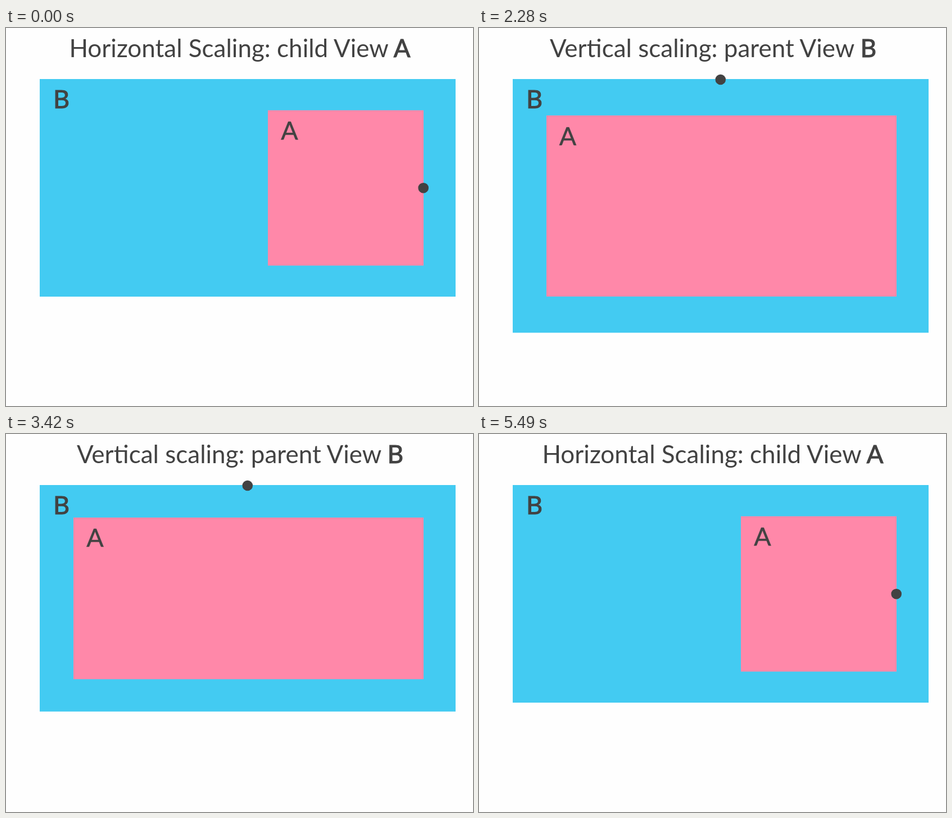
An HTML page for the animation above (5.52 s loop, 831x674 px).

```html
<!DOCTYPE html>
<html lang="en">
<head>
<meta charset="utf-8">
<title>View scaling</title>
<style>
  html, body { margin: 0; width: 100%; height: 100%; overflow: hidden; background: #fefefe; }
  svg { display: block; width: 831px; height: 674px; }
  text { font: 44px Lato, "Noto Sans", sans-serif; fill: #424242; text-anchor: middle; }
  .label { font-size: 45px; }
  .strong { stroke: #424242; stroke-width: 1.1px; }
  circle { fill: #424242; }
</style>
</head>
<body>
<svg viewBox="0 0 831 674">
  <rect id="parent" x="60" y="91" width="740" height="388" fill="#43cbf2"/>
  <rect id="child" fill="#ff88a9"/>
  <text class="label strong" x="98.5" y="143">B</text>
  <text class="label" id="childLabel" stroke="#424242" stroke-width=".5">A</text>
  <g id="horizontal">
    <text x="416" y="52">Horizontal Scaling: child View <tspan class="strong">A</tspan></text>
    <circle cx="742.7" cy="285.2" r="9.3"/>
  </g>
  <g id="vertical">
    <text x="416.5" y="52">Vertical scaling: parent View <tspan class="strong">B</tspan></text>
    <circle cx="429.8" cy="92" r="9.3"/>
  </g>
</svg>
<script>
const LOOP = 5520, STEP = 30, MOVE = 690, FADE = 170;
const TOP = 91, RIGHT = 743;
const $ = id => document.getElementById(id);
const parent = $('parent'), child = $('child'), childLabel = $('childLabel');
const horizontal = $('horizontal'), vertical = $('vertical');

const set = (el, attrs) => {
  for (const name in attrs) el.setAttribute(name, attrs[name]);
};
const ramp = (t, start, length) => Math.min(1, Math.max(0, (t - start) / length));
// Rises from 0 to 1 at `up` and returns to 0 at `down`.
const pulse = (t, up, down, length) => ramp(t, up, length) - ramp(t, down, length);

function draw(t) {
  const widen = pulse(t, 140, 4630, MOVE);
  const stretch = pulse(t, 1996, 2800, MOVE);
  const scale = 1 + 0.403 * stretch;
  const left = 466 - 346 * widen;
  const top = TOP + 55.7 * scale;

  set(parent, { height: 388 * scale });
  set(child, { x: left, y: top, width: RIGHT - left, height: 276.9 * scale });
  set(childLabel, { x: left + 38.5 - stretch, y: top + 52 + 1.7 * stretch });
  set(horizontal, { opacity: 1 - pulse(t, 1220, 3885 + FADE, FADE) });
  set(vertical, { opacity: pulse(t, 1220 + FADE, 3885, FADE) });
}

const origin = performance.now();
function tick() {
  const elapsed = (performance.now() - origin) % LOOP;
  draw(Math.floor(elapsed / STEP) * STEP);
  requestAnimationFrame(tick);
}
draw(0);
requestAnimationFrame(tick);
</script>
</body>
</html>
```
